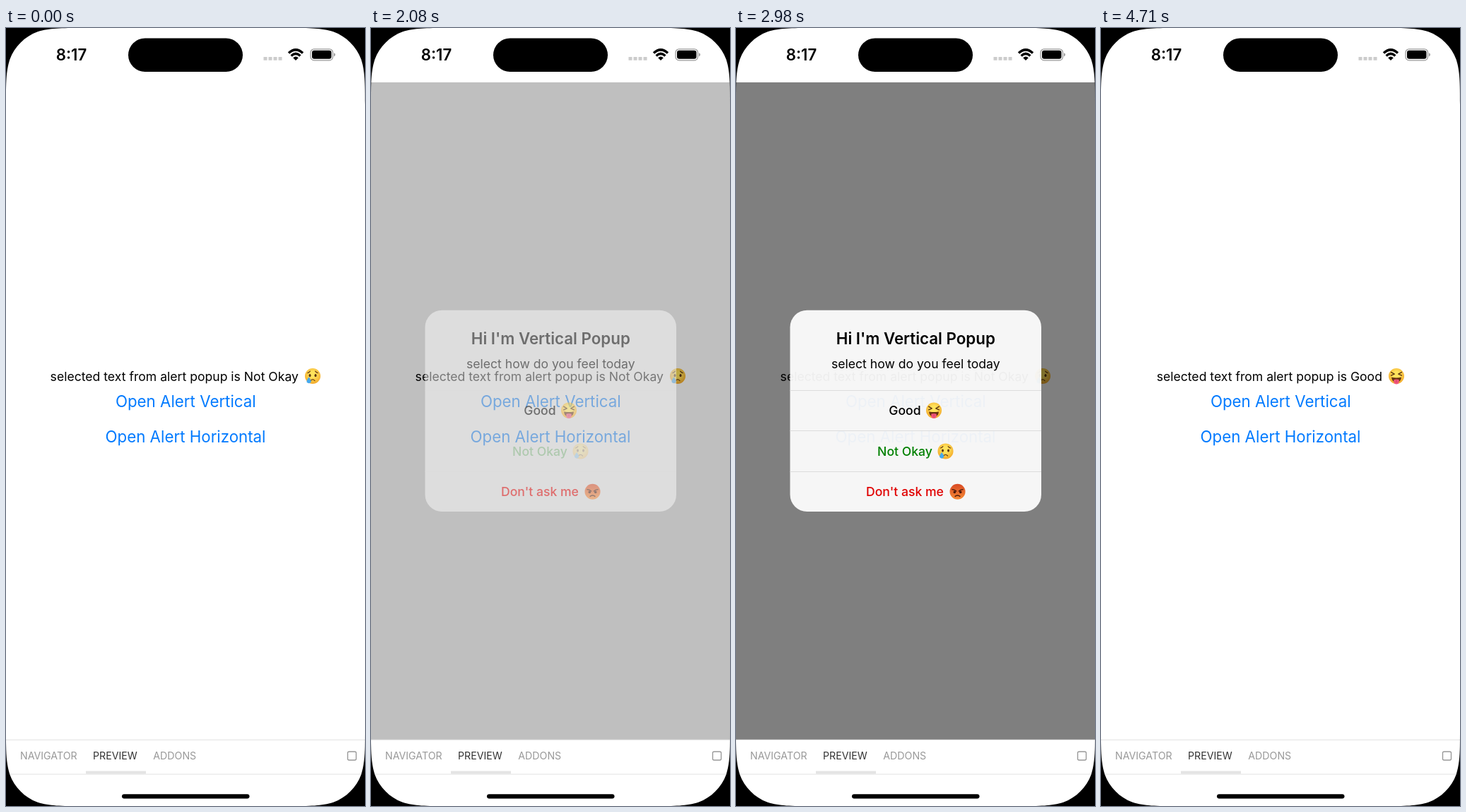
Animation of 508x1102 px, one loop 4.75 s. Source, as an HTML page:

```html
<!DOCTYPE html>
<html lang="en">
<head>
<meta charset="utf-8">
<title>Alert popup</title>
<style>
  html, body { margin: 0; width: 100%; height: 100%; overflow: hidden; background: #fff; }
  svg { display: block; width: 508px; height: 1102px; }
  text { font-family: Inter, "Open Sans", sans-serif; font-size: 17.6px; text-anchor: middle; }
  .button { font-size: 22.3px; fill: #007aff; }
  .title { font-size: 22.3px; font-weight: 600; }
  .row text { font-weight: 500; }
  .row path { stroke: #dcdcdc; }
  .tabs text { font-size: 14.2px; fill: #999; text-anchor: start; }
  .tabs .active { fill: #333; }
  .line { fill: none; stroke-linecap: round; stroke-linejoin: round; }
</style>
</head>
<body>
<svg viewBox="0 0 508 1102">
  <defs>
    <radialGradient id="yellow" cy=".4" r=".62">
      <stop offset=".3" stop-color="#ffe35c"/><stop offset="1" stop-color="#f2a526"/>
    </radialGradient>
    <linearGradient id="angryRed" x2="0" y2="1">
      <stop stop-color="#d94a24"/><stop offset="1" stop-color="#f58a35"/>
    </linearGradient>
    <g id="sad">
      <circle r="11" fill="url(#yellow)"/>
      <g fill="#5b3512"><ellipse cx="-4" cy="-.8" rx="1.5" ry="2.1"/><ellipse cx="4" cy="-.8" rx="1.5" ry="2.1"/></g>
      <path class="line" stroke="#6b4015" stroke-width="1.2" d="M-7.2-4.4Q-5-5-3.6-6.8M7.2-4.4Q5-5 3.6-6.8M-3 6.6Q0 3.2 3 6.6"/>
      <path fill="#45a9ee" d="M-5.4 1.6Q-1.8 6.2-2.4 8.2A3.2 3.2 0 0 1-8.4 8.2Q-9 6.2-5.4 1.6"/>
    </g>
    <g id="silly">
      <circle r="11" fill="url(#yellow)"/>
      <path class="line" stroke="#5b3512" stroke-width="1.4" d="M-7.4-5.4L-2.8-2.8L-7.4-.8M7.4-5.4L2.8-2.8L7.4-.8"/>
      <path fill="#65310f" d="M-7 1.8Q0 3.2 7 1.8Q6.2 8.8 0 8.8T-7 1.8"/>
      <path fill="#f0567a" d="M-3.7 5.2Q0 3.6 3.7 5.2V8A3.7 3.4 0 0 1-3.7 8Z"/>
      <path class="line" stroke="#c93660" stroke-width=".8" d="M0 5.4V8.6"/>
    </g>
    <g id="angry">
      <circle r="11" fill="url(#angryRed)"/>
      <g fill="#4a1a0c"><circle cx="-4.2" cy=".6" r="1.8"/><circle cx="4.2" cy=".6" r="1.8"/></g>
      <path class="line" stroke="#4a1a0c" stroke-width="1.4" d="M-7.6-3.2Q-4-2.8-1.8-.8M7.6-3.2Q4-2.8 1.8-.8M-3.4 6.6Q0 3.8 3.4 6.6"/>
    </g>
    <path id="corner" d="M0 0V108.5C0 77.3 0 61.7 5.3 44.8C12 26.5 26.5 12 44.8 5.3C61.7 0 77.3 0 108.5 0Z"/>
  </defs>

  <rect width="508" height="1102" fill="#fff"/>

  <g id="page">
    <text id="message" x="238.3" y="499.6"></text>
    <use id="mood" y="493"/>
    <text id="opener" class="button" x="254.3" y="537">Open Alert Vertical</text>
    <text class="button" x="254" y="587">Open Alert Horizontal</text>
  </g>

  <rect id="backdrop" y="77" width="508" height="931"/>
  <rect id="card" x="76.5" y="399.7" width="355.5" height="285.3" rx="24" fill="#fff"/>
  <g id="content">
    <text class="title" x="254.3" y="448.2">Hi I'm Vertical Popup</text>
    <text x="254.3" y="482">select how do you feel today</text>
    <g class="row" id="good">
      <path d="M76.5 513.5H432"/>
      <text x="239" y="548.4">Good</text><use href="#silly" x="280" y="541.6"/>
    </g>
    <g class="row" id="notOkay">
      <path d="M76.5 570.5H432"/>
      <text x="239" y="606" fill="#008000">Not Okay</text><use href="#sad" x="296.5" y="599.4"/>
    </g>
    <g class="row">
      <path d="M76.5 628.5H432"/>
      <text x="239" y="663.4" fill="#e00000">Don't ask me</text><use href="#angry" x="313.5" y="656.8"/>
    </g>
  </g>

  <g class="tabs">
    <path stroke="#e2e2e2" d="M0 1008.3H508M0 1057H508"/>
    <rect x="113" y="1052.5" width="85" height="4" fill="#e4e4e4"/>
    <text x="20" y="1036">NAVIGATOR</text>
    <text x="123" y="1036" class="active">PREVIEW</text>
    <text x="208.3" y="1036">ADDONS</text>
    <rect x="483.5" y="1025" width="12" height="12" rx="2" fill="none" stroke="#999" stroke-width="1.4"/>
  </g>

  <text x="92.5" y="46" style="font-size:22.2px;font-weight:600">8:17</text>
  <rect x="173" y="14.5" width="162" height="47.5" rx="23.75"/>
  <path stroke="#ccc" stroke-width="4.8" stroke-dasharray="5 2" d="M364.5 43.3H390.5"/>
  <g class="line" stroke="#000" stroke-width="3.4" style="stroke-linecap:butt">
    <path d="M400 35.6Q410 26.2 420 35.6M403.6 39.4Q410 33.4 416.4 39.4"/>
  </g>
  <path d="M410 46L406.2 42.2Q410 38.8 413.8 42.2Z"/>
  <rect x="431" y="29.8" width="31.5" height="16" rx="5" fill="none" stroke="#999" stroke-width="1.3"/>
  <rect x="433" y="31.8" width="27.5" height="12" rx="3.2"/>
  <path fill="#999" d="M464 35.2Q466 36 466 37.8T464 40.4Z"/>
  <rect x="164" y="1085.2" width="180.5" height="6.3" rx="3.15"/>

  <use href="#corner"/>
  <use href="#corner" transform="translate(508) scale(-1 1)"/>
  <use href="#corner" transform="translate(0 1102) scale(1 -1)"/>
  <use href="#corner" transform="translate(508 1102) scale(-1)"/>
</svg>

<script>
const LOOP = 4750;
// The picture holds still between these times.
const ticks = [0, 860, 940, 1010, 1090, 1160, 1240, 1910, 2000, 2080, 2150, 2220, 2290,
  2690, 2770, 2840, 2910, 2980, 4030, 4400, 4480, 4550, 4630, 4710];

const el = id => document.getElementById(id);
const clamp = v => Math.min(1, Math.max(0, v));
const ease = (t, start, duration) => {
  const p = clamp((t - start) / duration);
  return p * p * (3 - 2 * p);
};
const pressed = (t, down, up) => t < down ? 1 : 0.2 + 0.8 * clamp((t - up) / 250);
const fade = (id, value) => el(id).setAttribute("opacity", value);

function draw(now) {
  const time = now % LOOP;
  const t = ticks.filter(tick => tick <= time).pop();

  const shown = ease(t, 860, 380) - ease(t, 1910, 340) + ease(t, 2535, 400) - ease(t, 4330, 380);
  fade("backdrop", 0.5 * shown);
  fade("card", 0.93 * shown);
  fade("content", shown);

  fade("opener", pressed(t, 860, 940));
  fade("notOkay", pressed(t, 1910, 2010));
  fade("good", pressed(t, 4030, 4420));

  const happy = t >= 4400;
  el("message").textContent = "selected text from alert popup is " + (happy ? "Good" : "Not Okay");
  el("mood").setAttribute("href", happy ? "#silly" : "#sad");
  el("mood").setAttribute("x", happy ? 418 : 434);
}

const begin = performance.now();
function loop() {
  draw(performance.now() - begin);
  requestAnimationFrame(loop);
}
loop();
</script>
</body>
</html>
```
